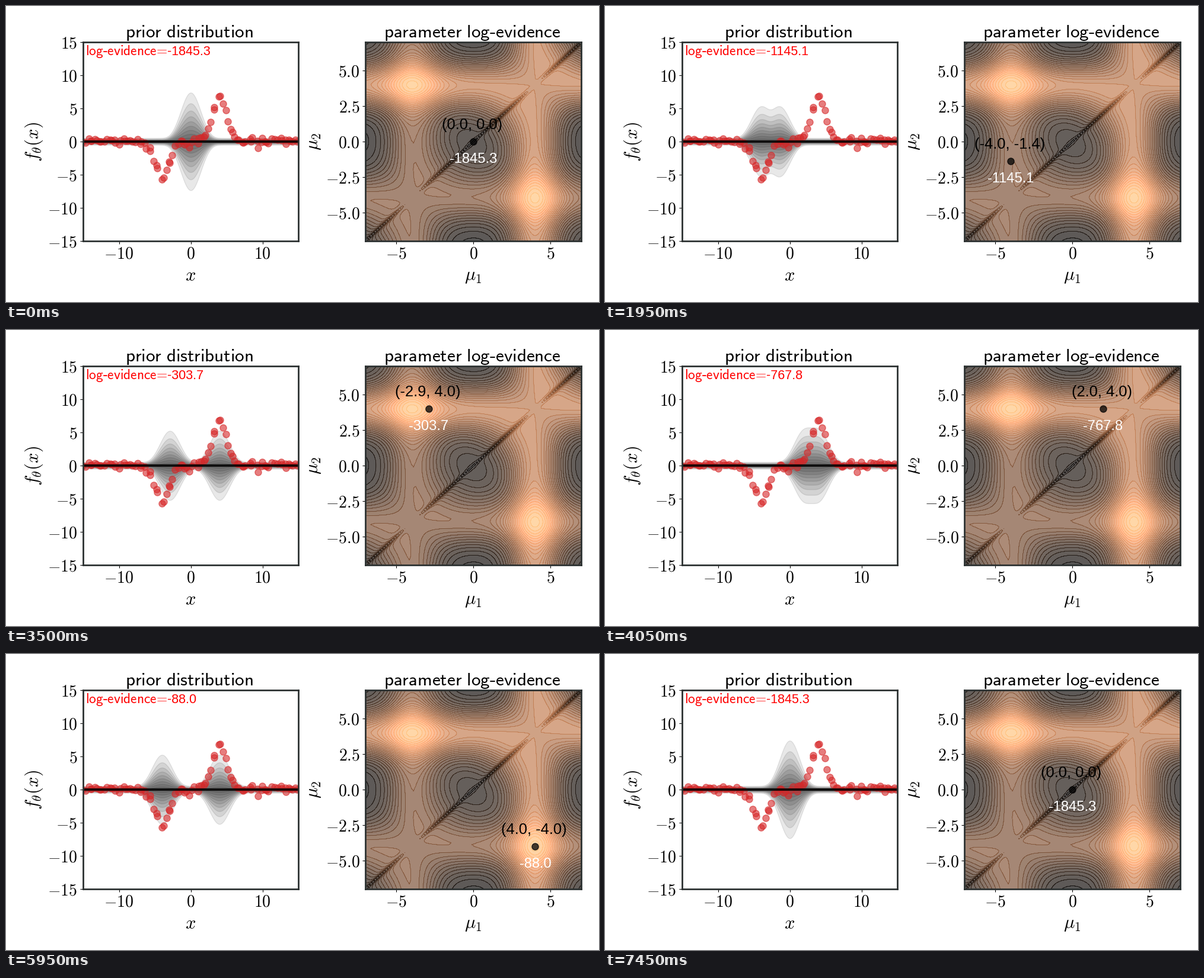
A matplotlib script that plays this animation: 1000 px wide and 500 px high, repeating every 7500 ms.

```python
from itertools import groupby

import matplotlib.pyplot as plt
import numpy as np
from matplotlib.animation import FuncAnimation

plt.rcParams["mathtext.fontset"] = "cm"

W, H = 1000, 500
TOP, BOTTOM = 61, 396.6
STEPS = 30                      # frames per leg of the tour
STOPS = np.array([(0, 0), (-4, -2), (-4, 4), (4, 4), (4, -4), (0, 0)], float)
FRAMES = STEPS * (len(STOPS) - 1)
PRIOR_VAR, NOISE_VAR = 10.0, 0.1
WORST, BEST = -1845.3, -88.0    # evidence at the origin and at the optimum
# upper normal quantiles 0.95, 0.90, ... 0.55
Z = (1.645, 1.282, 1.036, 0.842, 0.674, 0.524, 0.385, 0.253, 0.126)

# noisy observations of a dip at -4 and a peak at 4
rng = np.random.default_rng(4)
X = np.linspace(-15, 15, 92) + rng.normal(0, 0.12, 92)
Y = (6.6 * np.exp(-(X - 4) ** 2 / 2) - 5.8 * np.exp(-(X + 4) ** 2 / 2)
     + rng.normal(0, 0.33, 92))


def bump(x, mu):
    return np.exp(-(x - mu) ** 2 / 4)


def log_evidence(m1, m2):
    """Log marginal likelihood of a two-bump linear model, up to a constant."""
    m1, m2 = np.broadcast_arrays(m1, m2)
    f1, f2 = bump(X, m1[..., None]), bump(X, m2[..., None])
    ridge = NOISE_VAR / PRIOR_VAR
    a1, a2 = (f1 * f1).sum(-1) + ridge, (f2 * f2).sum(-1) + ridge
    c, b1, b2 = (f1 * f2).sum(-1), f1 @ Y, f2 @ Y
    det = a1 * a2 - c * c
    fit = (b1 * b1 * a2 - 2 * b1 * b2 * c + b2 * b2 * a1) / det
    return 0.5 * (fit / NOISE_VAR - np.log(det))


def centres(i):
    leg, k = divmod(i, STEPS)
    s = np.sin(np.pi / 2 * k / (STEPS - 1)) ** 3
    return STOPS[leg] + (STOPS[leg + 1] - STOPS[leg]) * s


LOW, HIGH = log_evidence(np.array([0, 4]), np.array([0, -4]))


def reading(m1, m2):
    level = (log_evidence(m1, m2) - LOW) / (HIGH - LOW)
    return WORST + (BEST - WORST) * level


def sans(s):
    """Sans-serif math text with plain hyphens and no operator spacing."""
    out = ""
    for word, chars in groupby(s, lambda c: c.isalnum() or c == " "):
        part = "".join(chars).replace(" ", r"\ ")
        out += (r"\mathsf{%s}" if word else r"\text{%s}") % part
    return f"${out}$"


fig = plt.figure(figsize=(W / 100, H / 100), dpi=100, facecolor="white")


def write(x, y, s, size, color="black", ha="center", **kw):
    return fig.text(x / W, 1 - y / H, s, fontsize=size, color=color, ha=ha,
                    va="baseline", family="Liberation Sans", **kw)


def panel(x, width, lim, xticks, yticks, fmt):
    ax = fig.add_axes([x / W, 1 - BOTTOM / H, width / W, (BOTTOM - TOP) / H])
    ax.set(xlim=(-lim, lim), ylim=(-lim, lim))
    ax.set_xticks(xticks, [f"${t:d}$" for t in xticks], fontsize=20)
    ax.set_yticks(yticks, [f"${t:{fmt}}$" for t in yticks], fontsize=20)
    ax.tick_params(axis="x", pad=2)
    for spine in ax.spines.values():
        spine.set(color="#2d3232", linewidth=2)
    return ax


left = panel(130, 363, 15, (-10, 0, 10), range(-15, 16, 5), "d")
right = panel(606.4, 364, 7, (-5, 0, 5), (-5, -2.5, 0, 2.5, 5), ".1f")

write(308.5, 53, sans("prior distribution"), 22.4)
write(786.5, 53, sans("parameter log-evidence"), 22.4)
write(311.5, 464, "$x$", 22)
write(788, 463, r"$\mu_1$", 22)
upright = dict(rotation=90, rotation_mode="anchor")
write(55, 229, r"$f_\theta(x)$", 22, **upright)
write(526, 229, r"$\mu_2$", 22, **upright)

grid = np.linspace(-15, 15, 301)
bands = [left.fill_between(grid, -1, 1, color="black", alpha=0.09, lw=1)
         for _ in Z]
left.scatter(X, Y, s=64, color="tab:red", alpha=0.6, lw=1)
left.plot([-15, 15], [0, 0], color="black", lw=3, alpha=0.85)

mu = np.linspace(-7, 7, 100)
surface = reading(mu[None, :], mu[:, None])
right.contourf(mu, mu, surface, 30, cmap="copper", alpha=0.67)
right.contour(mu, mu, surface, 30, cmap="copper", linewidths=0.5, alpha=0.65)

dot = right.scatter([0], [0], s=64, color="black", alpha=0.75, lw=1, zorder=5)
write(134, 83, sans("log-evidence="), 16.9, "red", "left")
score = write(272, 83, "", 15.5, "red", "left")
place = write(0, 0, "", 18.4)
value = write(0, 0, "", 17.1, "white")


def draw(i):
    m1, m2 = centres(i)
    var = PRIOR_VAR * (bump(grid, m1) ** 2 + bump(grid, m2) ** 2) + NOISE_VAR
    for z, band in zip(Z, bands):
        top = z * np.sqrt(var)
        band.set_verts([np.column_stack([np.r_[grid, grid[::-1]],
                                         np.r_[top, -top[::-1]]])])
    dot.set_offsets([(m1, m2)])
    px, py = 788.4 + 26 * m1, (TOP + BOTTOM) / 2 - 23.97 * m2
    text = f"{reading(m1, m2):.1f}"
    score.set_text(text)
    value.set_text(text)
    value.set_position((px / W, 1 - (py + 36) / H))
    place.set_text(f"({m1:.1f}, {m2:.1f})")
    place.set_position(((px - 2) / W, 1 - (py - 21) / H))
    return [*bands, dot, score, place, value]


anim = FuncAnimation(fig, draw, frames=FRAMES, interval=50, repeat=True,
                     repeat_delay=0, blit=False)
plt.show()
```
